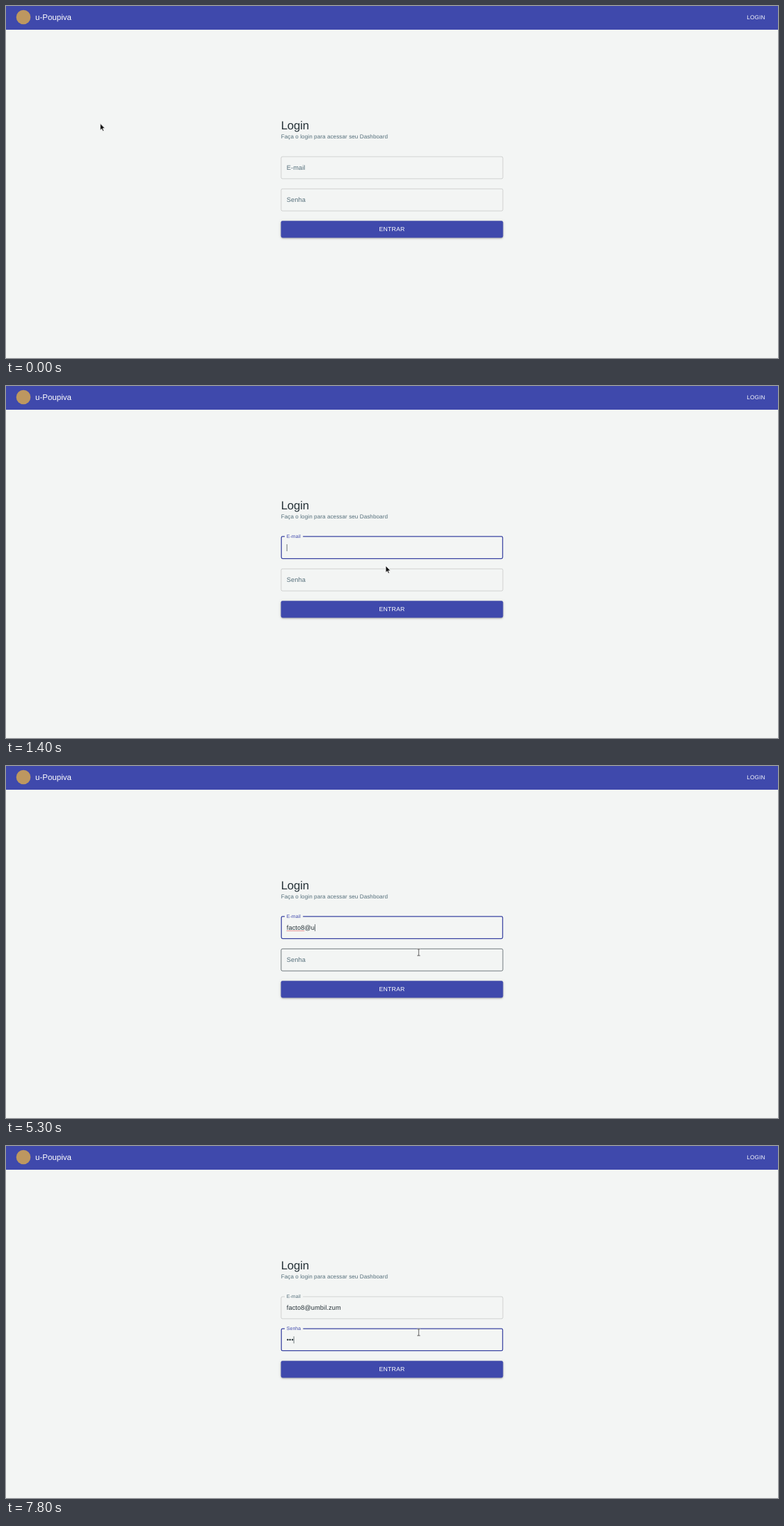
Animation, 1108 px wide and 505 px high, one loop 8 s. Source, as an HTML page:

```html
<!DOCTYPE html>
<html lang="pt">
<head>
<meta charset="utf-8">
<title>Login</title>
<style>
  html, body { margin: 0; width: 100%; height: 100%; overflow: hidden; background: #f3f5f4; }
  svg { display: block; }
  text {
    font-family: "Liberation Sans", Arial, sans-serif;
    text-rendering: geometricPrecision;
    white-space: pre;
  }
  .field { font-size: 9.23px; letter-spacing: .00938em; fill: #263238; }
  .caps { letter-spacing: .02857em; fill: #fff; }
  .button { filter: drop-shadow(0 1.1px .9px rgba(0, 0, 0, .28)) drop-shadow(0 .5px 2px rgba(0, 0, 0, .08)); }
</style>
</head>
<body>
<svg id="stage" width="1108" height="505" viewBox="0 0 1108 505">
  <rect width="1108" height="505" fill="#f3f5f4"/>
  <rect width="1108" height="34.05" fill="#3f49ac"/>
  <circle cx="25" cy="16" r="10.3" fill="#bd9760"/>
  <text x="42" y="19.8" font-size="11.54" fill="#fff">u-Poupiva</text>
  <text class="caps" x="1063.2" y="18.5" font-size="8.08">LOGIN</text>

  <text x="394.7" y="177.2" font-size="16.73" letter-spacing="-.14" fill="#263238">Login</text>
  <text x="394.7" y="189.9" font-size="8.08" letter-spacing=".0866" fill="#546e7a">Faça o login para acessar seu Dashboard</text>

  <g id="fields"></g>

  <rect class="button" x="394.6" y="308.16" width="318.8" height="24.24" rx="2.3" fill="#3f49ac"/>
  <text class="caps" x="554.1" y="323.4" font-size="8.66" text-anchor="middle">ENTRAR</text>

  <g id="arrow">
    <path d="M0 0V9.6L2.2 7.6L3.7 11L5.3 10.3L3.8 7H6.8Z"
      fill="#111" stroke="#fff" stroke-width=".7" stroke-linejoin="round"/>
  </g>
  <g id="beam" fill="none">
    <path d="M-2.4 -4.6H2.4M-2.4 4.6H2.4M0 -4.6V4.6" stroke="#fff" stroke-width="1.8"/>
    <path d="M-2.2 -4.6H2.2M-2.2 4.6H2.2M0 -4.6V4.6" stroke="#333" stroke-width=".8"/>
  </g>
</svg>
<script>
const LOOP = 8000, STEP = 100;
const LEFT = 394.6, RIGHT = 713.4, HEIGHT = 32.32, TEXT_X = 402.8;
const PX = 1108 / 1920;   // one page pixel on the stage
const LINE = .63;         // thin border, slightly heavier than PX to stay crisp
const GREY = [84, 110, 122], BLUE = [63, 73, 172];
const CARET_OFF = [[3200, 3400], [4100, 4600], [7300, 7400]];
const MISSPELT = [4500, 6700];

// time, x, y of the pointer
const POINTER = [
  [0, 135.2, 168.6], [300, 146, 165], [400, 180, 181], [500, 230, 219],
  [600, 288, 254], [700, 344, 268.5], [800, 385, 250], [900, 422, 224],
  [1000, 440, 225], [1100, 450, 228], [1200, 464, 233], [1300, 502, 246],
  [1400, 545, 258], [1500, 578, 265], [1600, 592.3, 267.4]
];

const FIELDS = [
  {
    label: "E-mail", top: 215.83, focus: 1200, blur: 6700, notchEnd: 426.2,
    value: "facto8@umbil.zum",
    keys: [1900, 2000, 2200, 2400, 2600, 3400, 5000, 5300, 5400, 5600, 5600, 5800, 6000, 6300, 6400, 6500]
  },
  {
    label: "Senha", top: 262, focus: 6700, blur: LOOP, notchEnd: 426.4,
    value: "•••", keys: [7400, 7600, 7800]
  }
];

const $ = id => document.getElementById(id);
const within = (t, [from, to]) => t >= from && t < to;
const mix = (a, b, p) => `rgb(${a.map((v, i) => Math.round(v + (b[i] - v) * p))})`;
const inside = (f, x, y) => x > LEFT && x < RIGHT && y > f.top && y < f.top + HEIGHT;

function set(el, attrs) {
  for (const name in attrs) el.setAttribute(name, attrs[name]);
}

function add(tag, attrs) {
  const el = document.createElementNS("http://www.w3.org/2000/svg", tag);
  set(el, attrs);
  return $("fields").appendChild(el);
}

const show = (el, on) => set(el, { visibility: on ? "visible" : "hidden" });

// Progress of the 200 ms decelerating label transition
function settle(elapsed) {
  if (elapsed < 0) return 0;
  return [.28, .93][elapsed / STEP] ?? 1;
}

// Rounded outline, with a gap in the top edge when notched
function outline(top, bottom, width, gapEnd) {
  const h = width / 2, r = 2.3 - h;
  const l = LEFT + h, t = top + h, b = bottom - h, e = RIGHT - h;
  const arc = (x, y) => `A${r} ${r} 0 0 1 ${x} ${y}`;
  return `M${gapEnd || 400} ${t}H${e - r}${arc(e, t + r)}V${b - r}${arc(e - r, b)}` +
    `H${l + r}${arc(l, b - r)}V${t + r}${arc(l + r, t)}H400`;
}

for (const f of FIELDS) {
  f.border = add("path", { fill: "none" });
  f.text = add("text", { class: "field", x: TEXT_X, y: f.top + 19.4 });
  f.caption = add("text", { class: "field" });
  f.caption.textContent = f.label;
  f.caret = add("rect", { y: f.top + 11.2, width: .65, height: 10, fill: "#263238" });
  f.squiggle = add("path", {
    fill: "none", stroke: "#e25555", "stroke-width": .8, "stroke-dasharray": "1.4 .5"
  });
}

function drawBorder(f, t, focused, hovered) {
  const width = focused ? 2 * LINE : LINE;
  // the thicker top edge stays centred on the notch, so it rises by one page pixel
  const top = focused ? f.top - PX : f.top;
  set(f.border, {
    d: outline(top, f.top + HEIGHT, width, t >= f.focus + STEP && f.notchEnd),
    "stroke-width": width,
    stroke: focused ? "#3a44a2" : hovered ? "#263238" : "rgba(0,0,0,.23)"
  });
}

function drawField(f, t, x, y) {
  const focused = within(t, [f.focus, f.blur]);
  drawBorder(f, t, focused, inside(f, x, y));

  const p = settle(t - f.focus);
  const scale = 1 - .25 * p;
  const baseline = f.top + (20 - 26 * p + 13.6 * scale) * PX;
  set(f.caption, { transform: `translate(${TEXT_X} ${baseline}) scale(${scale})` });
  f.caption.style.fill = mix(GREY, BLUE, p - settle(t - f.blur));

  const typed = f.value.slice(0, f.keys.filter(k => k <= t).length);
  if (f.text.textContent !== typed) f.text.textContent = typed;
  const end = typed ? f.text.getComputedTextLength() : 0;
  set(f.caret, { x: TEXT_X + end });
  show(f.caret, focused && !CARET_OFF.some(span => within(t, span)));

  const marked = focused && within(t, MISSPELT);
  show(f.squiggle, marked);
  if (marked) {
    const word = f.text.getSubStringLength(0, 6);
    set(f.squiggle, { d: `M${TEXT_X} ${f.top + 20.7}h${word}` });
  }
}

function draw(t) {
  const [, x, y] = POINTER.filter(p => p[0] <= t).pop();
  for (const f of FIELDS) drawField(f, t, x, y);

  const overField = FIELDS.some(f => inside(f, x, y));
  for (const id of ["arrow", "beam"]) {
    set($(id), { transform: `translate(${x} ${y})` });
    show($(id), (id === "beam") === overField);
  }
}

const begin = performance.now();
function tick() {
  const t = (performance.now() - begin) % LOOP;
  draw(Math.floor(t / STEP) * STEP);
  requestAnimationFrame(tick);
}
tick();
</script>
</body>
</html>
```
